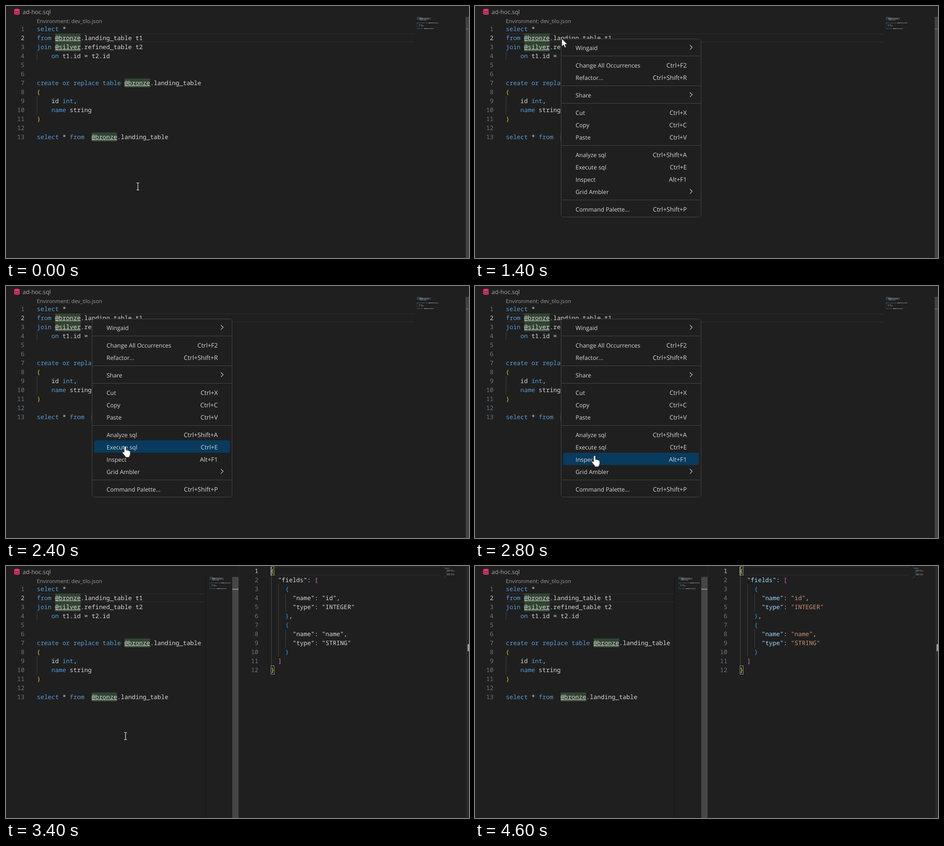
Write an HTML page that moves like this. It is 976 px wide and 532 px high and loops after 4800 ms.

```html
<!DOCTYPE html>
<html lang="en">
<head>
<meta charset="utf-8">
<title>SQL editor</title>
<style>
  html, body { margin: 0; width: 100%; height: 100%; overflow: hidden; background: #1f1f1f; }
  svg { display: block; }
  text { font: 12.4px "Open Sans", "Noto Sans", sans-serif; fill: #d8d8d8; text-rendering: geometricPrecision; }
  .code { font: 12.83px "Noto Sans Mono", monospace; }
  .key { font-size: 13px; }
</style>
</head>
<body>
<svg id="stage" width="976" height="532" viewBox="0 0 976 532"></svg>
<script>
const LOOP = 4800, CHAR = 7.7, ROW = 19;
const stage = document.getElementById('stage');

function add(parent, tag, attrs = {}, text) {
  const node = document.createElementNS('http://www.w3.org/2000/svg', tag);
  for (const key in attrs) node.setAttribute(key, attrs[key]);
  if (text !== undefined) node.textContent = text;
  return parent.appendChild(node);
}
const group = (parent = stage) => add(parent, 'g');
const rect = (parent, x, y, width, height, fill, more) =>
  add(parent, 'rect', { x, y, width, height, fill, ...more });
const label = (parent, x, y, text, more) => add(parent, 'text', { x, y, ...more }, text);

// Holds each value until the next [time, value] step.
function play(node, prop, steps) {
  const frames = steps.map(([t, value]) => ({ offset: t / LOOP, [prop]: value, easing: 'step-end' }));
  frames.push({ offset: 1, [prop]: steps[steps.length - 1][1] });
  node.animate(frames, { duration: LOOP, iterations: Infinity });
}

// Shows a node only during the given [from, to] spans.
function show(node, ...spans) {
  const steps = spans[0][0] > 0 ? [[0, 0]] : [];
  for (const [from, to] of spans) {
    steps.push([from, 1]);
    if (to < LOOP) steps.push([to, 0]);
  }
  play(node, 'opacity', steps);
}

const sql = `select *
from @bronze.landing_table t1
join @silver.refined_table t2
    on t1.id = t2.id


create or replace table @bronze.landing_table
(
    id int,
    name string
)

select * from  @bronze.landing_table`.split('\n');

const json = `{
  "fields": [
    {
      "name": "id",
      "type": "INTEGER"
    },
    {
      "name": "name",
      "type": "STRING"
    }
  ]
}`.split('\n');

const KEYWORD = /^(select|from|join|on|create|or|replace|table|int|name)$/;
const BRACKETS = ['#ffd700', '#da70d6', '#179fff'];

function tokens(lines) {
  const out = [];
  let depth = 0;
  lines.forEach((line, row) => {
    for (const m of line.matchAll(/@\w+|"\w+"|\w+|[^\w\s]/g)) {
      const text = m[0], col = m.index;
      let color = '#d8d8d8';
      if (/[[{(]/.test(text)) color = BRACKETS[depth++];
      else if (/[\]})]/.test(text)) color = BRACKETS[--depth];
      else if (text[0] === '"') color = line[col + text.length] === ':' ? '#9cdcfe' : '#ce9178';
      else if (KEYWORD.test(text)) color = '#569cd6';
      out.push({ text, row, col, color });
    }
  });
  return out;
}

function drawCode(parent, lines, x, top, active) {
  lines.forEach((_, i) => label(parent, x - 26, top + 14 + i * ROW, i + 1,
    { class: 'code', 'text-anchor': 'end', style: `fill:${i === active ? '#ccc' : '#6e7681'}` }));
  for (const { text, row, col, color } of tokens(lines)) {
    const tx = x + col * CHAR, ty = top + row * ROW;
    if (text[0] === '@') {
      rect(parent, tx, ty, text.length * CHAR, ROW, '#314531');
      rect(parent, tx, ty + 15, text.length * CHAR, 1, '#d4d4d4');
    }
    const node = label(parent, tx, ty + 14, text, { class: 'code', style: `fill:${color}` });
    if (text[0] === '"') play(node, 'fill', [[0, '#d8d8d8'], [3600, color]]);
  }
}

function minimap(parent, lines, x, y) {
  for (const { text, row, col, color } of tokens(lines))
    rect(parent, x + col, y + row * 2, text.length, 1.3, color, { opacity: text[0] === '@' ? .6 : .42 });
}

function currentLine(parent, x, y, width) {
  rect(parent, x, y, width, 2, '#282828');
  rect(parent, x, y + 17, width, 2, '#282828');
}

const guide = (parent, x, y, rows, color = '#404040') => rect(parent, x, y, 1, rows * ROW, color);

// Left editor
const wide = group(), narrow = group();
rect(stage, 0, 0, 976, 1, '#191b20');
currentLine(wide, 65, 58, 796);
minimap(wide, sql, 866, 23);
rect(wide, 969, 23, 7, 509, '#434343');
rect(wide, 969, 48, 7, 1, '#777');

currentLine(narrow, 65, 58, 354);
rect(narrow, 419, 23, 3, 509, '#1a1a1a');
minimap(narrow, sql, 429, 23);
rect(narrow, 477, 23, 13, 509, '#464646');
rect(narrow, 477, 48, 13, 2, '#8f8f8f');
show(wide, [0, 3400]);
show(narrow, [3400, LOOP]);

const left = group();
add(left, 'path', { fill: '#f5336f', d: 'M17 8.2a6 2.3 0 0 1 12 0v8a6 2.3 0 0 1-12 0z' });
add(left, 'path', { fill: 'none', stroke: '#1f1f1f', d: 'M17 9.3a6 2.2 0 0 0 12 0M17 13.2a6 2.2 0 0 0 12 0' });
label(left, 35, 17, 'ad-hoc.sql', { style: 'fill:#a9a9a9' });
label(left, 65, 36, 'Environment: dev_tilo.json', { style: 'fill:#999;font-size:11.2px' });
guide(left, 65, 96, 1);
guide(left, 65, 191, 2);
drawCode(left, sql, 65, 39, 1);
const caret = rect(left, 179.5, 58, 1.5, ROW, '#d0d0d0');
show(caret, [1200, 1400], [3000, 3400]);

// Result pane
const right = group();
rect(right, 490, 0, 486, 532, '#1f1f1f');
rect(right, 490, 0, 1, 532, '#2b2b2b');
currentLine(right, 558, 1, 357);
guide(right, 559, 20, 10, '#4c4c4c');
guide(right, 574, 39, 8);
guide(right, 589, 58, 2);
guide(right, 589, 134, 2);
for (const y of [1.5, 210.5])
  rect(right, 558.5, y, 7, 18, '#1d291d', { stroke: '#888' });
drawCode(right, json, 558, 1, 0);
rect(right, 558, 2, 1.5, 18, '#d0d0d0');
minimap(right, json, 923, 2);
rect(right, 969, 0, 1, 532, '#2a2a2a');
rect(right, 971, 0, 5, 532, '#292929');
rect(right, 973, 165, 3, 15, '#a0a0a0');
show(right, [3400, LOOP]);

// Context menu: [centre y, label, shortcut]; '>' opens a submenu.
const items = [
  [88, 'Wingaid', '>'], [125, 'Change All Occurrences', 'Ctrl+F2'], [151, 'Refactor...', 'Ctrl+Shift+R'],
  [188, 'Share', '>'], [225, 'Cut', 'Ctrl+X'], [251, 'Copy', 'Ctrl+C'], [277, 'Paste', 'Ctrl+V'],
  [314, 'Analyze sql', 'Ctrl+Shift+A'], [340, 'Execute sql', 'Ctrl+E'], [366, 'Inspect', 'Alt+F1'],
  [392, 'Grid Ambler', '>'], [429, 'Command Palette...', 'Ctrl+Shift+P']
];
const menu = group();
rect(menu, 181.5, 69.5, 295, 376, '#1f1f1f', { rx: 5, stroke: '#454545' });
for (const y of [105, 168, 205, 294, 409]) rect(menu, 182, y, 294, 1, '#454545');
const hover = rect(menu, 186, -14, 286, 26, '#083b5d', { rx: 3 });
for (const [y, name, key] of items) {
  label(menu, 212, y + 4.5, name);
  if (key === '>')
    add(menu, 'path', { d: `M453 ${y - 5.5}l4.8 4.8-4.8 4.8`, fill: 'none', stroke: '#ccc', 'stroke-width': 1.2 });
  else label(menu, 446.5, y + 4.5, key, { class: 'key', 'text-anchor': 'end' });
}
show(menu, [1400, 3000]);
show(hover, [1800, 3000]);
play(hover, 'transform',
  [[0, 151], [2000, 225], [2200, 314], [2400, 340], [2600, 366]].map(([t, y]) => [t, `translate(0px, ${y}px)`]));

// Pointer
const pointer = group();
const beam = add(pointer, 'path', {
  d: 'M-3 -7.5h2.2l.8.7.8-.7h2.2M0 -7v14M-3 7.5h2.2l.8-.7.8.7h2.2', fill: 'none', stroke: '#e8e8e8', 'stroke-width': 1.2
});
const arrow = add(pointer, 'path', {
  d: 'M0 0v16.5l3.8-3.6 2.6 6 2.7-1.2-2.6-5.8h5.3z', fill: '#fff', stroke: '#111', 'stroke-width': .8
});
const hand = add(pointer, 'path', {
  d: 'M-2 2q0-2 2-2t2 2v6q2-1.2 3.2.5 2-.8 2.8.9 2.4-.5 2.4 2v4q0 3-2 5v2h-8v-2q-3.5-3.5-6-7.4 0-2.4 2.4-1.7l1.2 1.2z',
  fill: '#fff', stroke: '#111', 'stroke-width': .9, 'stroke-linejoin': 'round', transform: 'scale(1.06)'
});
show(beam, [0, 1400], [3000, 4400]);
show(arrow, [1400, 1800]);
show(hand, [1800, 3000]);
play(pointer, 'transform', [
  [0, 278, 381], [200, 335, 268], [400, 404, 172], [600, 359, 274], [800, 264, 155], [1000, 180, 71],
  [1400, 183, 69], [1800, 214, 158], [2000, 241, 244], [2200, 248, 300], [2400, 251, 338],
  [2600, 252, 358], [3000, 252, 359], [4000, 253, 367], [4200, 253, 486]
].map(([t, x, y]) => [t, `translate(${x}px, ${y}px)`]));
</script>
</body>
</html>
```
